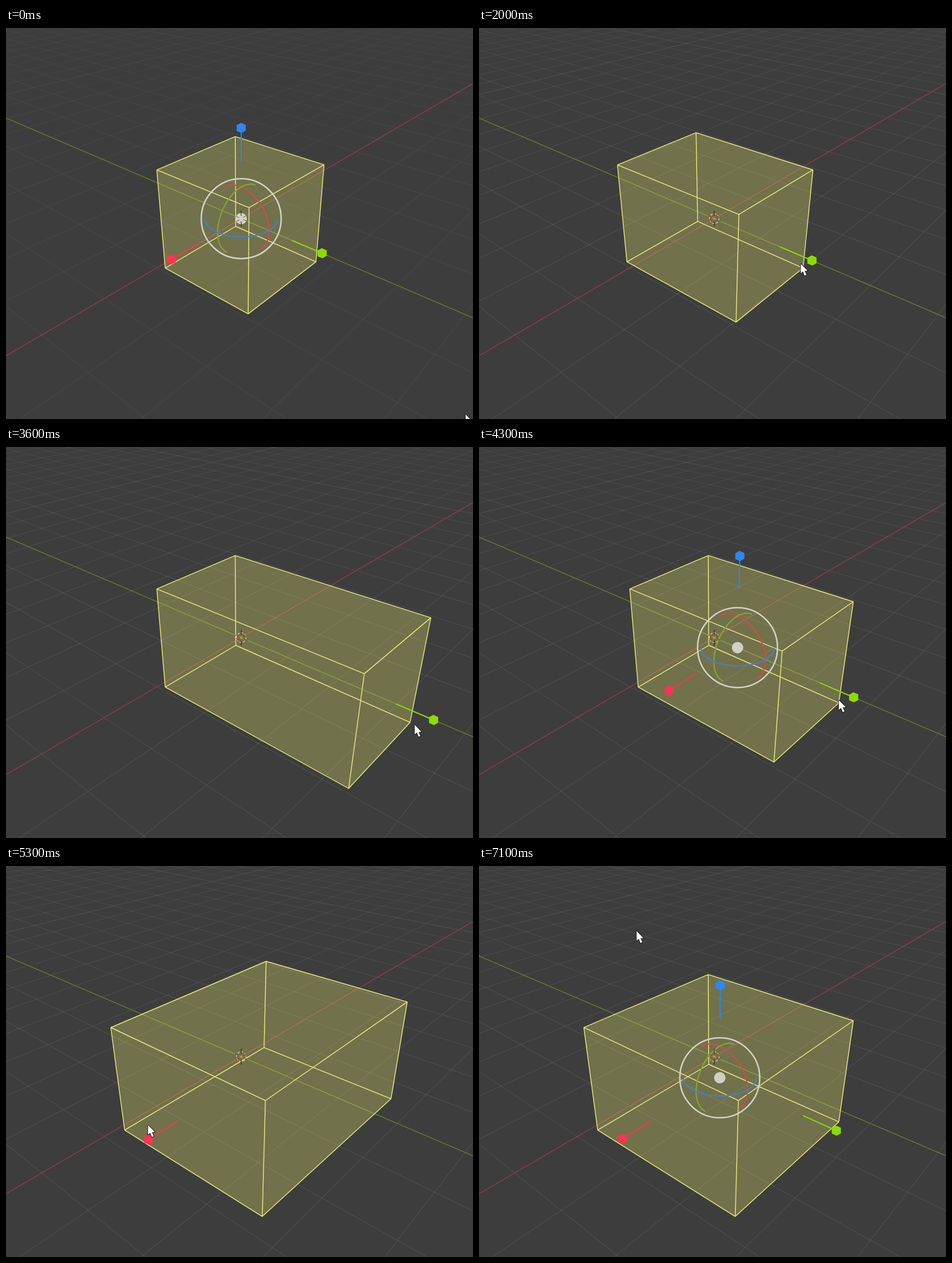
An HTML page with a canvas for the animation above (7.2 s loop, 818 by 685 pixels).

```html
<!DOCTYPE html>
<html lang="en">
<head>
<meta charset="utf-8">
<title>Scale cage</title>
<style>
  html, body { margin: 0; width: 100%; height: 100%; overflow: hidden; background: #3d3d3d; }
  canvas { display: block; }
</style>
</head>
<body>
<canvas id="view" width="818" height="685"></canvas>
<script>
const ctx = document.getElementById('view').getContext('2d');
const LOOP = 7200, STEP = 100;
const RED = '#ff3352', GREEN = '#8bdc00', BLUE = '#2f86f0', EDGE = '#eeee82';

// Perspective camera around the world origin
const ORIGIN = [412, 334];
const AXES = [[-63.8, 37.2], [75.06, 32.13], [0, -85.24]];
const DEPTH = [-.0674, -.0586, -.052];
const UNIT = AXES.map(a => a.map(c => c / 98.5));
const FACING = [.66, .56, .5];

// Box corners on the outline as seen by the camera, in order
const OUTLINE = [[0, 0, 1], [1, 0, 1], [1, 0, 0], [1, 1, 0], [0, 1, 0], [0, 1, 1]];

const dot = (p, q) => p.reduce((s, c, i) => s + c * q[i], 0);
const column = (m, k) => m.map(a => a[k]);
const weight = p => 1 + dot(p, DEPTH);
const project = p => ORIGIN.map((o, k) => o + dot(p, column(AXES, k)) / weight(p));
const offset = (c, v, r) => c.map((o, k) => o + r * dot(v, column(UNIT, k)));
const mix = (p, q, u) => p.map((c, k) => c + (q[k] - c) * u);

// Progress from 0 to 1 between two times, and a swing out and back
const span = (t, a, b) => Math.min(1, Math.max(0, (t - a) / (b - a)));
const ease = (t, a, b) => { const u = span(t, a, b); return u * u * (3 - 2 * u); };
const pulse = (t, a, b) => Math.sin(Math.PI * span(t, a, b)) ** 2;

// Each axis is first scaled about the center, then on one side only
function rangeX(t) {
  const both = 1 + 1.696 * pulse(t, 4760, 5500);
  return [-both, both + 1.96 * ease(t, 5600, 6050) - 1.005 * ease(t, 6050, 6450)];
}

function rangeY(t) {
  const both = 1 + 1.81 * pulse(t, 1050, 2150);
  return [-both, both - .135 * ease(t, 2800, 2900) + 2.235 * ease(t, 2900, 3350)
    - 1.045 * ease(t, 3400, 4100)];
}

const DRAGS = [[800, 2400], [2800, 4200], [4800, 5500], [5700, 6500]];

function path(points, close) {
  ctx.beginPath();
  points.forEach(p => ctx.lineTo(p[0], p[1]));
  if (close) ctx.closePath();
}

function line(points, color, width = 1) {
  path(points);
  ctx.strokeStyle = color;
  ctx.lineWidth = width;
  ctx.stroke();
}

function shape(points, color) {
  path(points, true);
  ctx.fillStyle = color;
  ctx.fill();
}

function disc(c, r, color) {
  ctx.beginPath();
  ctx.arc(c[0], c[1], r, 0, 2 * Math.PI);
  ctx.fillStyle = color;
  ctx.fill();
}

function arc(c, r, from, to, color, width) {
  ctx.beginPath();
  ctx.arc(c[0], c[1], r, from, to);
  ctx.strokeStyle = color;
  ctx.lineWidth = width;
  ctx.stroke();
}

// A floor line at a fixed coordinate, cut off before the camera plane
function floorLine(axis, at, color, width) {
  const end = (.92 + at * DEPTH[axis]) / -DEPTH[1 - axis];
  const point = s => project(axis ? [s, at, 0] : [at, s, 0]);
  line([point(-200), point(end)], color, width);
}

function fade(top, bottom) {
  const g = ctx.createLinearGradient(0, 0, 0, 260);
  g.addColorStop(0, `rgba(255,255,255,${top})`);
  g.addColorStop(1, `rgba(255,255,255,${bottom})`);
  return g;
}

function drawFloor(t) {
  const k = .55 + .45 * span(t, 0, 900);
  const fine = fade(.045 * k, .078 * k), coarse = fade(.08 * k, .1 * k);
  for (const axis of [0, 1]) {
    for (let i = -90; i <= 12; i++) {
      if (i === 0 || (i < -30 && i % 10)) continue;
      floorLine(axis, i, i % 10 ? fine : coarse, 1.2);
    }
  }
  floorLine(1, 0, '#9a3b48', 1.4);
  floorLine(0, 0, '#64802a', 1.4);
}

function drawCage(x, y) {
  const corner = ([i, j, k]) => project([x[i], y[j], 2 * k - 1]);
  shape(OUTLINE.map(corner), 'rgba(255,255,113,.268)');
  for (const i of [0, 1]) {
    for (const j of [0, 1]) {
      const edges = [[[0, i, j], [1, i, j]], [[i, 0, j], [i, 1, j]], [[i, j, 0], [i, j, 1]]];
      edges.forEach(e => line(e.map(corner), EDGE, 1.4));
    }
  }
}

function drawOrigin() {
  for (let i = 0; i < 16; i++) {
    arc(ORIGIN, 8.5, i * Math.PI / 8, (i + 1) * Math.PI / 8, i % 2 ? '#c9605a' : '#e0dccb', 1.2);
  }
  disc(ORIGIN, 2, '#d98a35');
}

function drawCross() {
  for (const [dx, dy] of [[0, -1], ...UNIT.slice(0, 2)]) {
    for (const s of [-1, 1]) {
      line([5, 14].map(r => [ORIGIN[0] + dx * r * s, ORIGIN[1] + dy * r * s]),
        dx ? 'rgba(25,20,15,.6)' : '#1c1c18');
    }
  }
}

// Half circle facing the camera, spanned by axes a and b
function dial(c, a, b, color) {
  const mid = Math.atan2(FACING[b], FACING[a]);
  const points = [];
  for (let i = -24; i <= 24; i++) {
    const t = mid + i * Math.PI / 48, v = [0, 0, 0];
    v[a] = Math.cos(t);
    v[b] = Math.sin(t);
    points.push(offset(c, v, 64));
  }
  line(points, color, 2.3);
}

function drawDials(c) {
  dial(c, 1, 2, '#cc4e48');
  dial(c, 0, 2, '#83a436');
  dial(c, 0, 1, '#4b7ccb');
  arc(c, 70, 0, 2 * Math.PI, '#d4d4ce', 2.5);
  disc(c, 10, 'rgba(222,222,216,.86)');
}

// A point beyond a face, at a distance that stays constant on screen
function beyond(mid, axis, face, distance) {
  const p = [...mid];
  p[axis] = face + distance * weight(mid);
  return project(p);
}

function drawHandle(mid, axis, face, color) {
  const tip = beyond(mid, axis, face, .7);
  line([beyond(mid, axis, face, .1), tip], color, 2);
  shape(OUTLINE.map(c => offset(tip, c.map(n => 2 * n - 1), 5.7)), color);
}

// The pointer rests near the green handle, then near the red one
function pointerAt(t, mid, x, y) {
  const green = beyond(mid, 1, y[1], .7), red = beyond(mid, 0, x[1], .7);
  const gripY = [green[0] - 8.5 - 8.5 * y[1], green[1] + 4.2 * (y[1] - .865) - 12 * (y[0] + 1)];
  const gripX = [red[0] - 1, red[1] + 2 - 14 * x[1]];
  const arrive = mix([805, 677], gripY, ease(t, 0, 800));
  const cross = mix(arrive, gripX, ease(t, 4300, 4750));
  return mix(cross, [276, 114], ease(t, 6500, 7100));
}

function drawPointer([x, y]) {
  const arrow = [[0, 0], [0, 17], [3.8, 13.6], [6.8, 21], [10, 19.6], [7, 12.6], [12, 12.3]]
    .map(p => [x + p[0], y + p[1]]);
  line([...arrow, arrow[0]], '#161616', 2);
  shape(arrow, '#fff');
}

function draw(t) {
  const x = rangeX(t), y = rangeY(t);
  const mid = [(x[0] + x[1]) / 2, (y[0] + y[1]) / 2, 0];
  const dragging = DRAGS.some(([a, b]) => t >= a && t < b);
  const active = t < 4500 ? 1 : 0;
  const handles = [[0, x[1], RED], [1, y[1], GREEN], [2, 1, BLUE]];

  ctx.fillStyle = '#3d3d3d';
  ctx.fillRect(0, 0, 818, 685);
  ctx.lineJoin = 'round';
  drawFloor(t);
  drawCage(x, y);
  drawOrigin();
  if (!dragging) drawDials(project(mid));
  drawCross();
  handles.filter(h => !dragging || h[0] === active).forEach(h => drawHandle(mid, ...h));
  drawPointer(pointerAt(t, mid, x, y));
}

const start = performance.now();
function tick() {
  const t = (performance.now() - start) % LOOP;
  draw(Math.floor(t / STEP) * STEP);
  requestAnimationFrame(tick);
}
tick();
</script>
</body>
</html>
```
